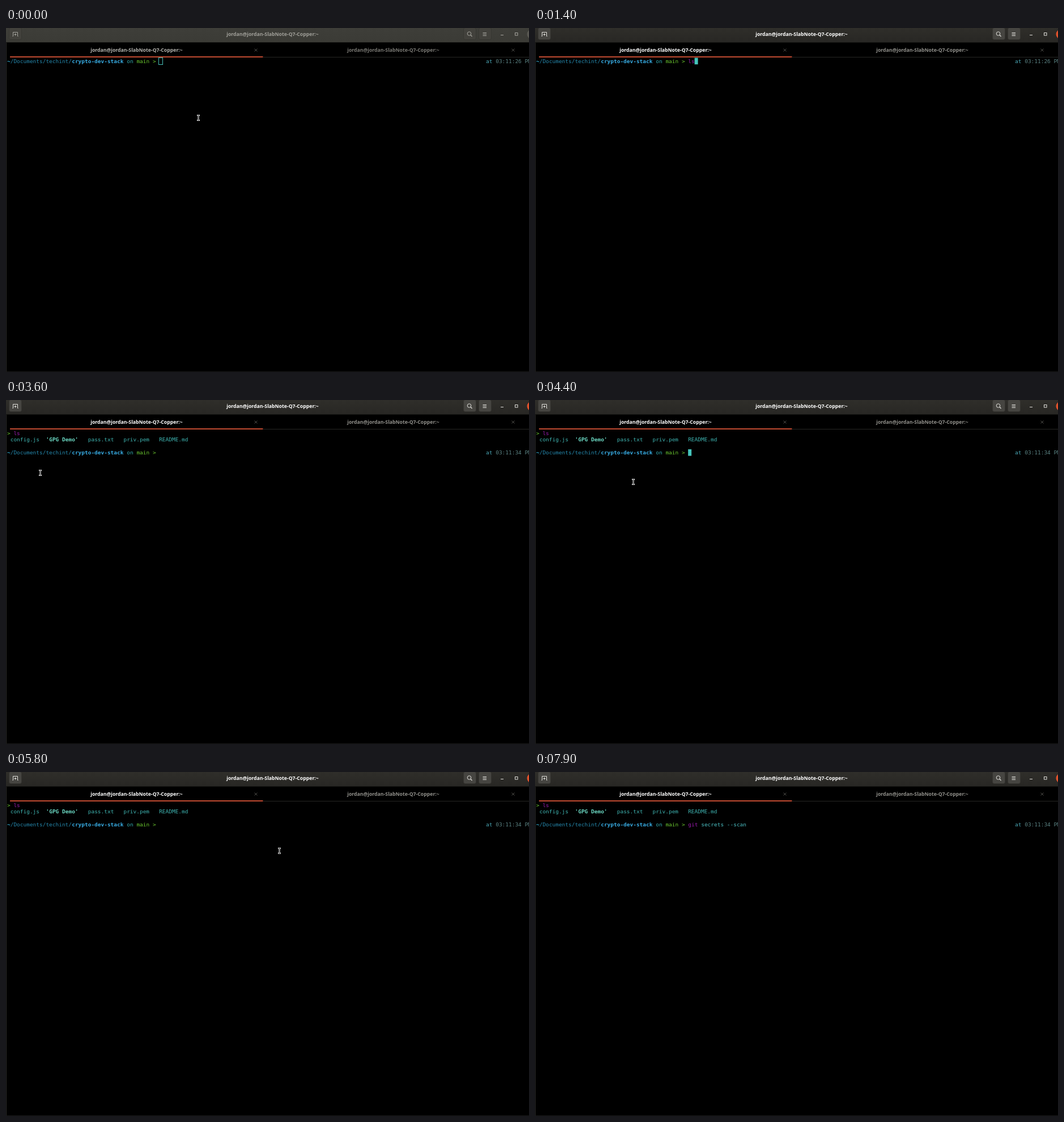
An HTML page with a canvas that plays this animation: 923 px wide and 607 px high, repeating every 8000 ms.

```html
<!DOCTYPE html>
<html lang="en">
<head>
<meta charset="utf-8">
<title>Terminal</title>
<style>
html, body { margin: 0; width: 100%; height: 100%; overflow: hidden; background: #000; }
canvas { display: block; }
</style>
</head>
<body>
<canvas id="stage" width="923" height="607"></canvas>
<script>
const ctx = document.getElementById('stage').getContext('2d');
const LOOP = 8000, TICK = 100, BLINK = 615, BLINK_LAG = 155;
const FOCUS = 500, ENTER = 1600;
const COL = 5.71, ROW = 11.45, LEFT = 2, TOP = 52.6, PROMPT_END = 47;
const HOST = 'jordan@jordan-SlabNote-Q7-Copper:~';
const MONO = '9.485px "DejaVu Sans Mono", monospace';
const SANS = 'bold 8.7px "Open Sans", "Noto Sans", sans-serif';
const TEAL = '#3fb5b2', GREEN = '#6bc82f';

// Command line after each key press, which also restarts the cursor blink
const keys = [
  [FOCUS, ''], [1300, 'l'], [1400, 'ls'], [ENTER, ''],
  [6600, 'g'], [6800, 'gi'], [7000, 'git s'], [7400, 'git secrets --scan ']
];

// Pointer strokes: begin, end, x, y, sideways bow
const strokes = [
  [600, 1000, 422.5, 162.5],
  [2600, 2900, 280, 31.5],
  [2900, 3300, 306.5, 220.5, 44],
  [3500, 3600, 60.5, 128.5],
  [3600, 3800, 80, 100],
  [3900, 4000, 53.5, 84.5],
  [4000, 4200, 146.5, 105.5],
  [4300, 4400, 173.5, 144.5],
  [4600, 4700, 231.5, 100.5],
  [4800, 5200, 280, 52.5, 125],
  [5300, 5400, 215.5, 75],
  [5400, 5800, 482.5, 139]
];

function pointerAt(t) {
  let x = 339.5, y = 158.5;
  for (const [begin, end, toX, toY, bow = 0] of strokes) {
    if (t <= begin) break;
    const k = Math.min(1, (t - begin) / (end - begin));
    const dx = toX - x, dy = toY - y;
    const side = bow * Math.sin(Math.PI * k) / Math.hypot(dx, dy);
    x += dx * k - dy * side;
    y += dy * k + dx * side;
  }
  return [x, y];
}

function mix(a, b, k) {
  return `rgb(${a.map((v, i) => Math.round(v + (b[i] - v) * k))})`;
}

function rect(x, y, w, h, color) {
  ctx.fillStyle = color;
  ctx.fillRect(x, y, w, h);
}

function line(color, width, ...points) {
  ctx.strokeStyle = color;
  ctx.lineWidth = width;
  ctx.beginPath();
  points.forEach(([x, y], i) => i ? ctx.lineTo(x, y) : ctx.moveTo(x, y));
  ctx.stroke();
}

function disc(x, y, r) {
  ctx.beginPath();
  ctx.arc(x, y, r, 0, Math.PI * 2);
}

function label(str, x, y, color) {
  ctx.font = SANS;
  ctx.textAlign = 'center';
  ctx.fillStyle = color;
  ctx.fillText(str, x, y);
}

function put(str, col, row, color, bold) {
  ctx.font = (bold ? 'bold ' : '') + MONO;
  ctx.textAlign = 'left';
  ctx.fillStyle = color;
  ctx.fillText(str, LEFT + col * COL, Math.round(TOP + row * ROW + 9.4));
}

function button(x, fill, edge) {
  ctx.beginPath();
  ctx.roundRect(x + .5, -.5, 22, 21, 3);
  ctx.fillStyle = fill;
  ctx.fill();
  ctx.strokeStyle = edge;
  ctx.lineWidth = 1;
  ctx.stroke();
}

function tabClose(x) {
  for (const s of [-2.5, 2.5]) line('#4c4b47', 1, [x - s, 36.5], [x + s, 41.5]);
}

function header(focus) {
  const tone = (a, b) => mix(a, b, focus);
  const shade = ctx.createLinearGradient(0, 0, 0, 25);
  shade.addColorStop(0, tone([62, 62, 57], [47, 46, 42]));
  shade.addColorStop(1, tone([59, 59, 54], [40, 39, 36]));
  rect(0, 0, 923, 25, shade);
  rect(0, 25, 923, 1, '#151513');

  const fill = tone([66, 65, 60], [70, 69, 65]);
  const edge = tone([54, 54, 49], [52, 51, 47]);
  const icon = tone([165, 164, 158], [226, 225, 220]);
  for (const x of [5, 807, 834]) button(x, fill, edge);

  // New tab
  line(icon, 1, [11.5, 14.5], [12.5, 14.5], [12.5, 7.5], [20.5, 7.5], [20.5, 14.5], [21.5, 14.5]);
  line(icon, 1, [14.5, 11.5], [18.5, 11.5]);
  line(icon, 1, [16.5, 9.5], [16.5, 13.5]);
  // Search and menu
  disc(817.5, 10, 3.3);
  ctx.stroke();
  line(icon, 1.2, [820, 12.5], [822.5, 15]);
  for (const y of [8.5, 11, 13.5]) line(icon, 1, [841.5, y], [848, y]);
  // Window controls
  line(icon, 1, [873, 12.5], [878, 12.5]);
  ctx.strokeRect(898.5, 8.5, 4.5, 4.5);
  disc(928, 11, 8.5);
  ctx.fillStyle = tone([90, 89, 83], [224, 82, 44]);
  ctx.fill();

  label(HOST, 470.5, 14, tone([160, 159, 153], [255, 255, 255]));
  label(HOST, 230.5, 42, tone([180, 179, 174], [255, 255, 255]));
  label(HOST, 683.5, 42, tone([122, 121, 116], [145, 144, 139]));
  tabClose(441);
  tabClose(895);
  rect(454, 51, 469, 1, '#262624');
  rect(7, 50, 446.5, 2, '#c04a31');
}

function prompt(row, clock) {
  put('~', 0, row, '#35b4dc', true);
  put('/Documents/techint/', 1, row, '#2589ae');
  put('crypto-dev-stack', 20, row, '#38aee6', true);
  put('on', 37, row, '#31abb1');
  put('main >', 40, row, GREEN);
  put('at', 148, row, '#4aa9b8');
  put(clock + ' PM', 151, row, '#5b8384');
}

function command(str, col, row) {
  const word = str.split(' ')[0];
  put(word, col, row, '#9c1bb0');
  put(str.slice(word.length), col + word.length, row, '#4cc2c6');
}

function listing() {
  put('>', 0, 0, GREEN);
  command('ls', 2, 0);
  put('config.js', 1, 1, TEAL);
  put("'GPG Demo'", 12, 1, '#6cdac4', true);
  put('pass.txt   priv.pem   README.md', 25, 1, TEAL);
}

function blockCursor(t, wake, col, row) {
  const x = LEFT + col * COL, y = TOP + row * ROW;
  if (wake === undefined) {
    ctx.strokeStyle = '#46bdb8';
    ctx.lineWidth = 1;
    ctx.strokeRect(Math.floor(x) - .5, Math.floor(y) + .5, 7, 12);
  } else if (Math.floor((t - wake + BLINK_LAG) / BLINK) % 2 === 0) {
    rect(x - .2, y, 6, 11.6, '#45c5bc');
  }
}

function beam(x, y) {
  const shape = (color, width, w, h) => {
    line(color, width, [x, y - h], [x, y + h]);
    for (const s of [-h, h]) line(color, width, [x - w, y + s], [x + w, y + s]);
  };
  shape('#e8e8e8', 2.2, 2.5, 4.4);
  shape('#222', .7, 1.7, 4.4);
}

function draw(t) {
  rect(0, 0, 923, 607, '#000');
  rect(0, 26, 1, 581, '#2a2a28');
  rect(0, 606, 923, 1, '#1a1a19');
  header(Math.min(1, Math.max(0, (t - FOCUS + TICK) / (2 * TICK))));

  const listed = t >= ENTER;
  const row = listed ? 3 : 0;
  const [wake, typed] = keys.filter(k => k[0] <= t).pop() || [undefined, ''];
  if (listed) listing();
  prompt(row, listed ? '03:11:34' : '03:11:26');
  command(typed, PROMPT_END, row);
  blockCursor(t, wake, PROMPT_END + typed.length, row);

  // Typing hides the pointer until it is moved again
  const hidden = t >= 1400 && t < 2500 || t >= 6600;
  if (!hidden) beam(...pointerAt(t));
}

const start = performance.now();
function loop() {
  const t = (performance.now() - start) % LOOP;
  draw(Math.floor(t / TICK) * TICK);
  requestAnimationFrame(loop);
}
loop();
</script>
</body>
</html>
```
